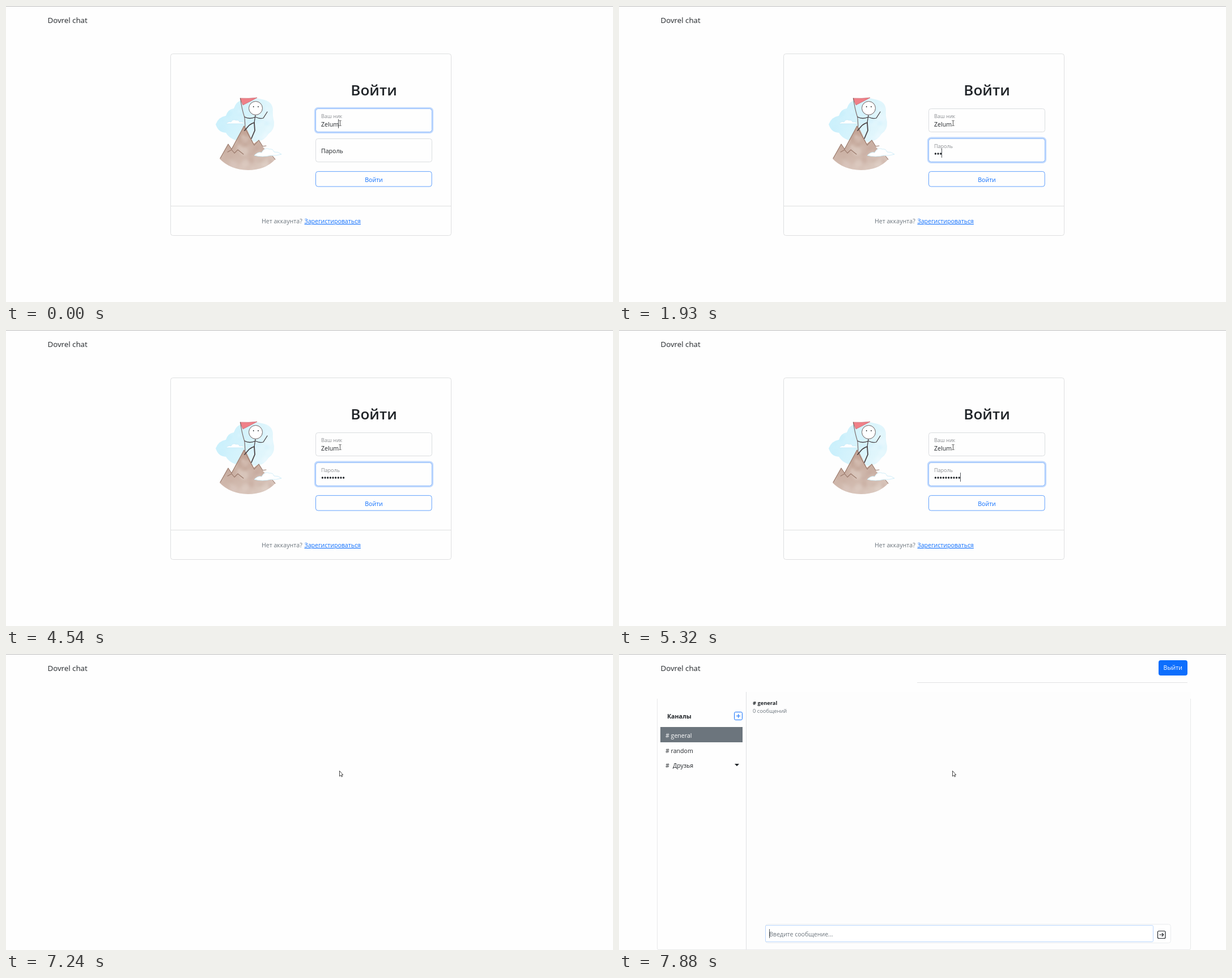
Recreate the animation shown at these times as an HTML page. Size 1071 by 523 pixels, loop 8 s.

```html
<!DOCTYPE html>
<html lang="ru">
<head>
<meta charset="utf-8">
<title>Chat login</title>
<style>
  html, body { margin: 0; width: 100%; height: 100%; overflow: hidden; background: #fefefe; }
  svg { display: block; width: 1071px; height: 523px; font: 10.6px "Open Sans", "Noto Sans", sans-serif; fill: #212529; }
  .brand { font-size: 13.3px; }
  .title { font-size: 26px; font-weight: 600; text-anchor: middle; }
  .small { font-size: 9.3px; }
  .label { font-size: 9px; fill: #8a8d91; }
  .muted { fill: #6c757d; }
  .bold { font-weight: 700; }
  .mid { text-anchor: middle; }
  .link { fill: #0d6efd; text-decoration: underline; }
  .blue { fill: #0d6efd; }
  .white { fill: #fff; }
  .card { fill: none; stroke: #dedfe0; }
  .box { fill: none; stroke: #dadde0; }
  .btn { fill: none; stroke: #62a1fd; }
  .ring { fill: none; stroke: #c2dafe; stroke-width: 2.8; }
  .focus { fill: none; stroke: #8fbcfe; }
  .caret { fill: #55595d; }
  .ink { fill: none; stroke: #4b4345; stroke-width: 1.3; stroke-linecap: round; stroke-linejoin: round; }
  .leg { stroke-width: 1.8; }
  .pole { stroke: #75605d; stroke-width: 1.1; }
  .ridge { fill: none; stroke: #99786a; stroke-width: 1.1; stroke-linejoin: round; stroke-linecap: round; }
  .cloud { fill: #fff; stroke: #c5e9f6; stroke-width: .8; }
</style>
</head>
<body>
<svg viewBox="0 0 1071 523">
  <defs>
    <filter id="soft"><feGaussianBlur stdDeviation="2"/></filter>
    <linearGradient id="skyFill" x2="1" y2=".3">
      <stop stop-color="#c6effc"/><stop offset="1" stop-color="#e2f6fc"/>
    </linearGradient>
    <linearGradient id="rockFill" x1=".35" y1="0" x2=".7" y2="1">
      <stop stop-color="#bf9f90"/><stop offset="1" stop-color="#d9c6bc"/>
    </linearGradient>
    <clipPath id="rock"><path id="rockShape" d="M377 270 L392 244 L398 252 L420 212 L424 216 L437 243 L446 237 L453 249 L475 271 Q457 290 427 290 Q395 289 377 270Z"/></clipPath>
    <clipPath id="sky"><path id="skyShape" d="M370 209 Q375 196 388 194 Q392 182 402 181 Q406 168 419 165 Q437 160 452 165 Q470 168 471 183 Q470 193 473 205 Q474 219 463 226 Q456 238 442 240 L405 237 Q393 233 388 224 Q374 223 370 209Z"/></clipPath>
  </defs>
  <rect width="1071" height="1" fill="#bdbdbd"/>
  <text class="brand" x="73.5" y="29.5">Dovrel chat</text>

  <g id="login">
    <rect class="card" x="290.5" y="84.5" width="495" height="321" rx="4"/>
    <path class="card" d="M291 353.5H785"/>

    <g id="art">
      <use href="#skyShape" fill="url(#skyFill)"/>
      <g clip-path="url(#sky)"><g id="skyWash" filter="url(#soft)"/></g>
      <path class="cloud" d="M388 208 Q393 203 397 205 Q400 199 406 202 Q411 201 412 205 Q419 204 421 208Z"/>
      <use href="#rockShape" fill="url(#rockFill)"/>
      <g clip-path="url(#rock)"><g id="rockWash" filter="url(#soft)"/></g>
      <path class="ridge" d="M378 269 L392 244 L398 253 L420 212 L429 230 L438 246 L446 237 L453 248 L459 247 M391 258 L398 254 L403 260 L409 254 L419 262 M470 265 L475 271"/>
      <path class="cloud" d="M438 264 Q445 257 451 259 Q456 249 465 253 Q471 252 473 258 Q480 257 486 262 Q476 265 468 264 Q452 268 438 264Z"/>
      <path d="M413 163 Q428 164 443 162 Q432 168 418 175Z" fill="#f08088" stroke="#cf6a71" stroke-width=".8"/>
      <path class="ink pole" d="M413.5 163 Q416 182 421 197 L422 213"/>
      <circle cx="440.5" cy="180.5" r="12" fill="#fff" stroke="#6a5f60"/>
      <circle cx="436.7" cy="178" r=".9"/><circle cx="445" cy="178" r=".9"/>
      <path class="ink" d="M440 193 L438 206 M440 196 Q430 201 421 196 M440 196 Q448 200 454 198 L461 187"/>
      <path class="ink leg" d="M438 206 Q430 209 427 213 L421 220 M438 206 L439 220 L433 234"/>
    </g>

    <text class="title" x="649" y="158">Войти</text>

    <rect class="box" x="546.5" y="181.5" width="205" height="41" rx="4"/>
    <rect class="box" x="546.5" y="234.5" width="205" height="41" rx="4"/>
    <g id="focus">
      <rect class="ring" x="545.2" y="180.2" width="207.6" height="43.6" rx="5.5"/>
      <rect class="focus" x="546.5" y="181.5" width="205" height="41" rx="4"/>
    </g>
    <text class="label" x="556" y="198">Ваш ник</text>
    <text x="556" y="212.5">Zelum</text>
    <text id="passEmpty" x="556" y="259.5">Пароль</text>
    <text id="passLabel" class="label" x="556" y="250.5">Пароль</text>
    <g id="dots"></g>
    <rect id="caret" class="caret" width="1" height="16"/>

    <rect class="btn" x="546.5" y="292.4" width="204.7" height="26.6" rx="4"/>
    <text class="blue mid" x="649" y="310.5">Войти</text>
    <text class="muted" x="451" y="384">Нет аккаунта?</text>
    <text class="link" x="526.5" y="384">Зарегистироваться</text>
    <path d="M587.5 202.5h1.5l.5 .5l.5-.5h1.5M589.5 203v8M587.5 211.5h1.5l.5-.5l.5 .5h1.5" fill="none" stroke="#444" stroke-width=".9"/>
  </g>

  <g id="nav">
    <path d="M526 50.5H1003" stroke="#e1e2e3"/>
    <rect class="blue" x="952" y="11" width="51" height="27" rx="4"/>
    <text class="white mid" x="977.3" y="28.3">Выйти</text>
  </g>

  <path id="spinner" d="M545.54 302.04A9.95 9.95 0 1 1 545.54 287.96" fill="none" stroke="#0d6efd" stroke-width="2.8"/>

  <g id="chat">
    <rect x="225" y="67" width="784" height="455" fill="#fdfdfd"/>
    <path d="M67.5 79V520Q67.5 522.5 70 522.5H1006Q1008.5 522.5 1008.5 520V79" fill="none" stroke="#e8e9ea"/>
    <path d="M224.5 67V522" stroke="#dee0e2"/>
    <text class="bold" x="85" y="114">Каналы</text>
    <rect x="203.6" y="102.6" width="13.8" height="13.8" rx="2" fill="none" stroke="#0d6efd"/>
    <path d="M207 109.5h7M210.5 106v7" stroke="#0d6efd"/>
    <rect x="73" y="129" width="145" height="27" fill="#6c757d"/>
    <text class="white" x="82" y="147.5"># general</text>
    <text x="82" y="174.5"># random</text>
    <text x="82" y="201">#</text><text x="95" y="201">Друзья</text>
    <path d="M204 194h8l-4 4.3z"/>
    <text class="small bold" x="236" y="89.5"># general</text>
    <text class="small muted" x="236" y="104">0 сообщений</text>
    <rect x="258.5" y="477.5" width="715" height="33" rx="4" fill="#fff" stroke="#eaecee"/>
    <text class="muted" x="265" y="498.5">Введите сообщение...</text>
    <rect x="950.5" y="489.5" width="13.5" height="13" rx="2" fill="none" stroke="#212529" stroke-width="1.2"/>
    <path d="M953.5 496h7M957.8 493l3 3l-3 3" fill="none" stroke="#212529" stroke-width="1.1"/>
    <g id="typing">
      <rect x="258.5" y="479.5" width="684" height="29" rx="2" fill="none" stroke="#b9d6fe"/>
      <rect class="caret" x="265" y="486" width="1" height="16"/>
    </g>
  </g>

  <path id="arrow" d="M588.5 206.5v9.6l2.2-2l1.5 3l1.4-.7l-1.4-2.9h2.5z" fill="#fff" stroke="#333" stroke-width=".9"/>
</svg>
<script>
const LOOP = 8000, PITCH = 4.65;
const PASSWORD = 650, LOADING = 7240, NAV = 7390, TURN = 7570, CHAT = 7760, TYPING = 7880;

// time, typed characters, caret on
const STEPS = [
  [0, 0, 1], [260, 0, 0], [650, 0, 1], [1040, 0, 0], [1420, 1, 1], [1670, 2, 1],
  [1930, 3, 1], [2190, 4, 1], [2440, 5, 1], [2830, 6, 1], [3330, 7, 1], [3880, 8, 1],
  [4000, 9, 1], [4540, 9, 0], [5040, 9, 1], [5320, 10, 1], [5850, 10, 0], [6350, 10, 1], [6970, 10, 0]
];

const el = id => document.getElementById(id);
const show = (id, on) => { el(id).style.display = on ? '' : 'none'; };

function addCircle(parent, attrs) {
  const c = document.createElementNS('http://www.w3.org/2000/svg', 'circle');
  for (const k in attrs) c.setAttribute(k, attrs[k]);
  el(parent).append(c);
}

let seed = 7;
const rand = (a, b) => {
  seed = seed * 16807 % 2147483647;
  return a + (b - a) * seed / 2147483647;
};

// soft watercolour blotches
function wash(parent, x0, y0, x1, y1, colors, count) {
  for (let i = 0; i < count; i++) {
    addCircle(parent, {
      cx: rand(x0, x1), cy: rand(y0, y1), r: rand(2, 8),
      fill: colors[i % colors.length], opacity: rand(.15, .4)
    });
  }
}
wash('skyWash', 370, 165, 472, 240, ['#eefafe', '#c3edfb'], 45);
wash('rockWash', 377, 225, 475, 290, ['#e9ddd6', '#bd9f92', '#dccac0'], 70);

for (let i = 0; i < 10; i++) addCircle('dots', { cx: 558.4 + i * PITCH, cy: 261, r: 1.65 });
const dots = [...el('dots').children];

function draw(t) {
  const [, typed, caretOn] = STEPS.findLast(s => s[0] <= t);
  const inPass = t >= PASSWORD;

  show('login', t < LOADING);
  show('passEmpty', !inPass);
  show('passLabel', inPass);
  el('focus').setAttribute('transform', `translate(0 ${inPass ? 52.8 : 0})`);
  dots.forEach((d, i) => { d.style.display = i < typed ? '' : 'none'; });

  show('caret', caretOn);
  el('caret').setAttribute('x', inPass ? Math.floor(556 + typed * PITCH) : 586);
  el('caret').setAttribute('y', inPass ? 252 : 200);

  show('arrow', t >= LOADING);
  show('nav', t >= NAV);
  show('spinner', t >= NAV && t < CHAT);
  el('spinner').setAttribute('transform', `rotate(${t < TURN ? 40 : 126} 538.5 295)`);
  show('chat', t >= CHAT);
  show('typing', t >= TYPING);
}

function tick() {
  draw(performance.now() % LOOP);
  requestAnimationFrame(tick);
}
tick();
</script>
</body>
</html>
```
